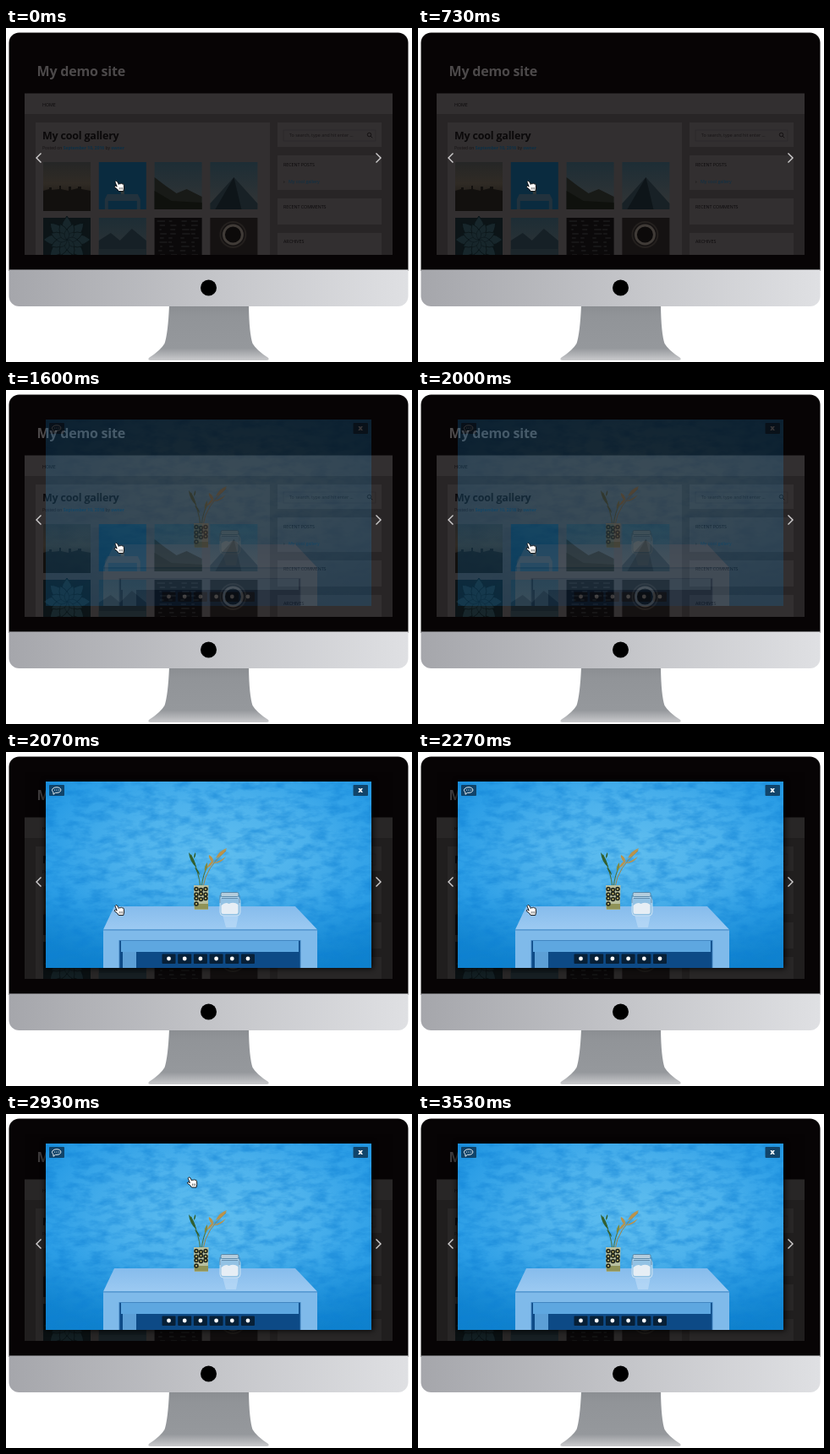
An HTML page that plays this animation: 480x396 px, repeating every 3590 ms.

```html
<!DOCTYPE html>
<html lang="en">
<head>
<meta charset="utf-8">
<title>Gallery lightbox</title>
<style>
  html, body { margin: 0; width: 100%; height: 100%; overflow: hidden; background: #fff; }
  svg { display: block; width: 100%; height: 100%; }
  text { font-family: "Open Sans", "Noto Sans", sans-serif; font-size: 5.3px; fill: #0b090a; }
  .title { font-weight: 700; font-stretch: 75%; }
  .link { fill: #0c3046; }
</style>
</head>
<body>
<svg viewBox="0 0 480 396">
  <defs>
    <linearGradient id="chin"><stop stop-color="#a5a6ab"/><stop offset=".5" stop-color="#c3c4c8"/><stop offset="1" stop-color="#dfe0e3"/></linearGradient>
    <linearGradient id="stand" x2="0" y2="1"><stop stop-color="#8b8e92"/><stop offset=".2" stop-color="#919498"/><stop offset=".78" stop-color="#95989c"/><stop offset="1" stop-color="#c9cacc"/></linearGradient>
    <radialGradient id="wall" cx=".52" cy=".38" r=".7"><stop stop-color="#60beef"/><stop offset=".4" stop-color="#4db2ec"/><stop offset=".75" stop-color="#2c9ee6"/><stop offset="1" stop-color="#178cd9"/></radialGradient>
    <linearGradient id="floor" x2="0" y2="1"><stop offset=".6" stop-color="#0878c4" stop-opacity="0"/><stop offset="1" stop-color="#0878c4" stop-opacity=".6"/></linearGradient>
    <linearGradient id="tabletop" x2="0" y2="1"><stop stop-color="#86bcec"/><stop offset="1" stop-color="#9ccaf2"/></linearGradient>
    <linearGradient id="dawn" x2="0" y2="1"><stop stop-color="#252626"/><stop offset=".45" stop-color="#302b25"/><stop offset="1" stop-color="#110e0c"/></linearGradient>
    <linearGradient id="mist" x2="0" y2="1"><stop stop-color="#1d2d35"/><stop offset="1" stop-color="#333536"/></linearGradient>
    <filter id="plaster" x="0" y="0" width="1" height="1" color-interpolation-filters="sRGB">
      <feTurbulence type="fractalNoise" baseFrequency=".05 .11" numOctaves="4" seed="4"/>
      <feColorMatrix values="0 0 0 0 .05  0 0 0 0 .5  0 0 0 0 .83  2.4 0 0 0 -.95"/>
    </filter>
    <filter id="blur"><feGaussianBlur stdDeviation="3"/></filter>
    <clipPath id="screen"><path d="M22 24h435v245H22z"/></clipPath>
    <clipPath id="case"><rect x="3.500" y="5.500" width="472" height="324.500" rx="12"/></clipPath>
  </defs>

  <path d="M193 329H287Q287.500 362 291.500 374Q296 382 310 391Q312 394 308 394H171Q167 394 169 391Q183 382 187.500 374Q191.500 362 193 329Z" fill="url(#stand)"/>
  <g clip-path="url(#case)">
    <path d="M3 5h473v283H3z" fill="#070405"/>
    <path d="M3 286.500h473V330H3z" fill="url(#chin)"/>
  </g>
  <circle cx="239.500" cy="308" r="9.500"/>

  <g clip-path="url(#screen)">
    <text class="title" x="36.500" y="57" style="font-size:16px;fill:#4c494a;letter-spacing:-.2px">My demo site</text>
    <path d="M22 102h435v167H22z" fill="#282526"/>
    <path d="M22 77.500h435V102H22zM35 112h277v157H35zM321 112h123v29H321zM321 151h123v41H321zM321 202h123v31H321zM321 243h123v26H321z" fill="#322f30"/>
    <path d="M328 121h109v13H328z" fill="none" stroke="#2b2829" stroke-width=".6"/>
    <text x="43" y="93">HOME</text>
    <text class="title" x="43" y="132" style="font-size:12.500px;letter-spacing:-.2px">My cool gallery</text>
    <text x="43" y="144" style="font-size:5px;fill:#151213">Posted on <tspan class="link" font-weight="700">September 10, 2016</tspan> by <tspan class="link" font-weight="700">owner</tspan></text>
    <text x="335" y="129" style="fill:#171415">To search, type and hit enter ...</text>
    <g fill="none" stroke="#100d0e" stroke-width=".9"><circle cx="429.500" cy="126.500" r="2.200"/><path d="M431.200 128.200l2 2"/></g>
    <text x="328" y="164">RECENT POSTS</text>
    <text x="328" y="184">›</text>
    <text class="link" x="334" y="184">My cool gallery</text>
    <text x="328" y="214">RECENT COMMENTS</text>
    <text x="328" y="255">ARCHIVES</text>

    <g id="thumbs">
      <g><path fill="url(#dawn)" d="M0 0h56v56H0z"/><path fill="#12100e" d="M0 34l7-2v-2h3v3l9-1v-4h2v4l9 2v-5h3v4l8-2v-2h4v3l11 2v24H0z"/></g>
      <g><path fill="#0a2b3f" d="M0 0h56v56H0z"/><path fill="#22323d" d="M10 38h36l3 6v12h-4V46H11v10H7V44z"/><path fill="#30383a" d="M26 29h4v9h-4z"/></g>
      <g><path fill="url(#mist)" d="M0 0h56v56H0z"/><path fill="#181a17" d="M0 18l13 10 13 9 12-5 18 9v15H0z"/><path fill="#0f110d" d="M0 34l20 12 36 2v8H0z"/></g>
      <g><path fill="url(#mist)" d="M0 0h56v56H0z"/><path fill="#182126" d="M28 18l28 31v7H0v-7z"/><path fill="#0e1519" d="M28 18l9 38H6z"/></g>
      <g><path fill="#0c1417" d="M0 0h56v56H0z"/><g id="petals" fill="#17262b" stroke="#0b1417" transform="translate(28 26)"/></g>
      <g><path fill="url(#mist)" d="M0 0h56v56H0z"/><path fill="#162026" d="M0 27l14-9 11 9 14-14 17 14v29H0z"/><path fill="#1c262b" d="M0 37h56v19H0z"/></g>
      <g><path fill="#0b090a" d="M0 0h56v56H0z"/><g id="code" stroke="#222123" stroke-width="1.100"/></g>
      <g><path fill="#151212" d="M0 0h56v56H0z"/><circle cx="27" cy="20" r="11" fill="#0c0a0a" stroke="#403b37" stroke-width="3"/><circle cx="27" cy="20" r="15" fill="none" stroke="#24201e" stroke-width="2"/></g>
    </g>
  </g>

  <g id="shade" clip-path="url(#screen)">
    <path d="M22 24h435v245H22z" opacity=".2"/>
    <path d="M46 34h388v223H46z" filter="url(#blur)" opacity=".8"/>
  </g>

  <g id="lightbox">
    <path d="M47 35h385v221H47z" fill="url(#wall)"/>
    <path d="M47 35h385v221H47z" fill="url(#floor)"/>
    <path d="M47 35h385v221H47z" filter="url(#plaster)" opacity=".5"/>
    <path d="M134 222h214v34H134z" fill="#0d4a86"/>
    <path d="M136 223h210v14H136z" fill="#5ea7e0"/>
    <path d="M138 237h16v19h-16z" fill="#5c9fd6"/>
    <path d="M128 183h214l26 27.500H115z" fill="url(#tabletop)"/>
    <path d="M115 210.500h253V223H115zM115 223h19v33h-19zM348 223h20v33h-20z" fill="#7fbaea"/>
    <path d="M115 211h253M134 223.500h214M134 223v33M348 223v33" fill="none" stroke="#3f83bf" stroke-width=".9"/>
    <path d="M256 193h19l-3 15h-12z" fill="#d0e6fa" opacity=".45"/>

    <g fill="none" stroke-linecap="round">
      <path d="M230 161Q228 142 219 122M231 161Q233 144 238 136" stroke="#496d35"/>
      <path d="M233 160Q236 137 260 117" stroke="#a87e35" stroke-width=".9"/>
    </g>
    <path d="M225 137q-8-7-9-18 7 7 9 18zM222 126q0-5 2-7 1 5-2 7zM229 146q-4-4-6-9 5 2 6 9z" fill="#315f30"/>
    <path d="M237 138q3-7 9-10-2 7-9 10zM243 130q-4-5-3-8 4 2 5 6zM248 126q4-9 13-12-3 8-13 12zM244 132q8-2 16-8-6 9-16 8z" fill="#b9934c"/>
    <path d="M235 142q-1-7 3-11 1 7-3 11z" fill="#7d8942"/>
    <path d="M222 158h17.500l-.8 29h-16z" fill="#b9c0a0"/>
    <path d="M222.500 180h16.500v6.500h-16z" fill="#8f9358"/>
    <g id="dots" fill="#d9c872" stroke="#22281f" stroke-width="1.700"/>

    <path d="M254 172h21l2 4v14q0 4-4 4h-16q-4 0-4-4v-14z" fill="#93c2e4" stroke="#d9eaf6" stroke-width=".8"/>
    <path d="M254.500 182q5-5 9-2 6-3 11 1v9q0 2-2 2h-16q-2 0-2-2z" fill="#e6eef5"/>
    <rect x="254" y="166.500" width="21" height="5" rx="1.500" fill="#b4cddd" stroke="#4f7b9c" stroke-width=".8"/>
    <path d="M253 170v9M276 170v9M255 173.500h19" stroke="#567f9f" stroke-width=".8"/>

    <g fill="#0c2f4c" fill-opacity=".8">
      <rect x="51" y="39" width="18" height="13" rx="1"/>
      <rect x="410.500" y="39" width="17.500" height="13" rx="1"/>
    </g>
    <g id="buttons"/>
    <path d="M60 41.800c6.500 0 6.500 6.500 0 6.500h-1.500l-2.500 2v-2.600c-3-1.800-1.500-5.900 4-5.900z" fill="none" stroke="#fff" stroke-width=".9"/>
    <path d="M57.500 45h.1m2.400 0h.1m2.400 0h.1" stroke="#fff" stroke-width="1.200" stroke-linecap="round"/>
    <text x="419.200" y="48.300" text-anchor="middle" style="font-size:9px;font-weight:800;fill:#fff">x</text>
  </g>

  <path d="M41.500 148.500L36 154l5.500 5.500M437.500 148.500L443 154l-5.500 5.500" fill="none" stroke="#d2d0d1" stroke-width="1.400"/>
  <g id="cursor">
    <path d="M1 2.200Q2-.2 3.600 1.600L5.400 5Q6.200 3.400 7.500 4.300Q8.600 3.200 9.500 4.400Q11 3.900 11.300 5.600L11.600 9.500L10.800 13H5.200L3.600 10.600L.3 8.200Q0 6.600 1.600 6.700L3.200 7.600Z" fill="#fff" stroke="#080808" stroke-width=".9" stroke-linejoin="round"/>
    <path d="M6.200 8.500v2.600m1.800-2.600v2.600m1.700-2.600v2.600" stroke="#222" stroke-width=".6"/>
  </g>
</svg>
<script>
  const LOOP = 3590, STEP = 1000 / 15;
  const byId = id => document.getElementById(id);
  const repeat = (count, draw) => Array.from({ length: count }, (_, i) => draw(i)).join("");

  [...byId("thumbs").children].forEach((thumb, i) =>
    thumb.setAttribute("transform", `translate(${44 + i % 4 * 65.8} ${i < 4 ? 159 : 225})`));

  byId("petals").innerHTML = repeat(24, i => {
    const ring = Math.floor(i / 8), size = 1 - ring * .28;
    return `<path d="M0 0Q-13-13 0-28Q13-13 0 0Z" transform="rotate(${i * 45 + ring * 22}) scale(${size})"/>`;
  });

  let seed = 7;
  const random = () => (seed = seed * 16807 % 2147483647) / 2147483647;
  byId("code").innerHTML = repeat(36, i =>
    `<path d="M${3 + i % 4 * 13 + random() * 4} ${4 + Math.floor(i / 4) * 5}h${2 + random() * 8}"/>`);

  byId("dots").innerHTML = repeat(10, i =>
    `<circle cx="${225 + i % 3 * 5.5}" cy="${162.5 + Math.floor(i / 3) * 5.5 + i % 2}" r="1.9"/>`);

  byId("buttons").innerHTML = repeat(6, i => {
    const x = 192.5 + i * 18.7;
    return `<rect x="${x - 8}" y="239.500" width="16" height="11.500" rx="1" fill="#071a2c" fill-opacity=".88"/>
      <circle cx="${x}" cy="245" r="2.400" fill="#fff"/>`;
  });

  function render(now) {
    const time = now % LOOP;
    const tick = Math.floor((time + 5) / STEP) * STEP;
    const open = time >= 2070;
    byId("lightbox").setAttribute("opacity", open ? 1 : time >= 1130 ? .2 : 0);
    byId("shade").setAttribute("opacity", open ? 1 : 0);

    const progress = Math.min(1, Math.max(0, (tick - 2400) / 740)) ** 2;
    byId("cursor").setAttribute("transform", `translate(${128 + 166 * progress} ${180.5 - 205 * progress})`);
    byId("cursor").setAttribute("opacity", progress < 1 ? 1 : 0);
  }

  const start = performance.now();
  function loop() {
    render(performance.now() - start);
    requestAnimationFrame(loop);
  }
  loop();
</script>
</body>
</html>
```
